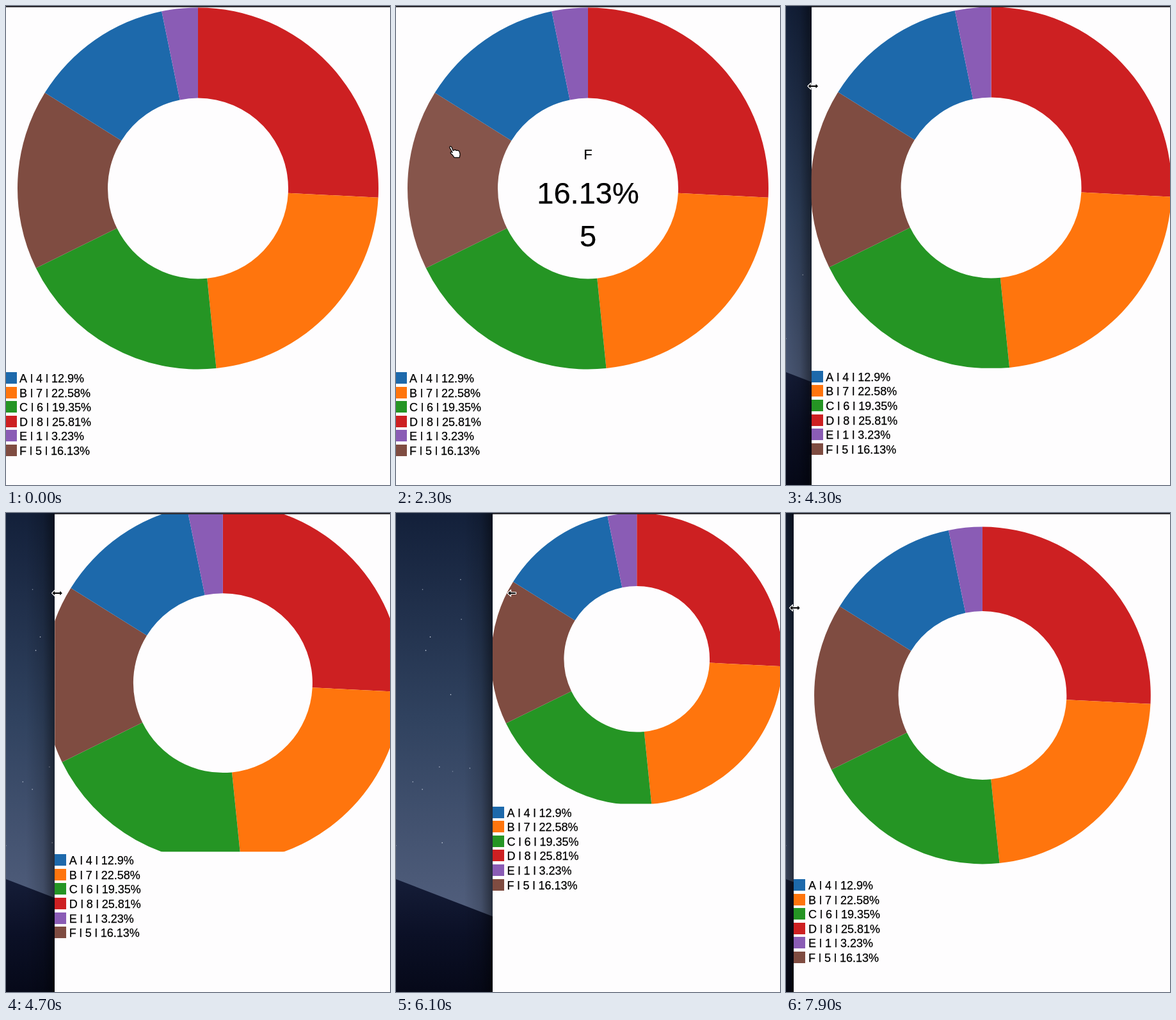
Recreate the animation shown at these times as an HTML page. Size 600x747 px, loop 8000 ms.

```html
<!DOCTYPE html>
<html lang="en">
<head>
<meta charset="utf-8">
<title>Resizable donut chart</title>
<style>
  html, body { margin: 0; width: 100%; height: 100%; overflow: hidden; background: #fefdfe; }
  svg { display: block; width: 600px; height: 747px; font-family: "Liberation Sans", Arial, sans-serif; }
  text { font-kerning: none; stroke: #000; stroke-width: .25; }
  rect { shape-rendering: crispEdges; }
</style>
</head>
<body>
<svg viewBox="0 0 600 747">
  <defs>
    <linearGradient id="sky" x2="0" y2="1">
      <stop offset="0" stop-color="#13203a"/>
      <stop offset=".5" stop-color="#30425f"/>
      <stop offset="1" stop-color="#53607e"/>
    </linearGradient>
    <linearGradient id="hill" x2="0" y2="1">
      <stop offset="0" stop-color="#151d38"/>
      <stop offset=".5" stop-color="#0b1026"/>
      <stop offset="1" stop-color="#060919"/>
    </linearGradient>
    <linearGradient id="shade">
      <stop offset="0" stop-color="#000" stop-opacity="0"/>
      <stop offset=".6" stop-color="#000" stop-opacity=".16"/>
      <stop offset="1" stop-color="#000" stop-opacity=".5"/>
    </linearGradient>
    <clipPath id="chart"><rect y="2"/></clipPath>
  </defs>
  <rect width="160" height="640" fill="url(#sky)"/>
  <g id="stars" fill="#dfe6f2"></g>
  <path d="M0 571L160 632.500V747H0Z" fill="url(#hill)"/>
  <g id="window"></g>
</svg>
<script>
const LOOP = 8000, STEP = 100, RIGHT = 601.5, TOP = 2;
const TURN = 2 * Math.PI, DRAG = 3000;
const $ = s => document.querySelector(s);

const total = 31;
const data = [
  ['A', 4, '#1d69ab'], ['B', 7, '#ff750d'], ['C', 6, '#259524'],
  ['D', 8, '#cd2022'], ['E', 1, '#8a5cb5'], ['F', 5, '#7f4c41']
].map(([name, value, color]) =>
  ({ name, value, color, share: +(100 * value / total).toFixed(2) + '%' }));

// Slices run clockwise from the top, largest first.
const slices = [...data].sort((a, b) => b.value - a.value);
let angle = 0;
for (const s of slices) {
  s.from = angle;
  s.to = angle += s.value / total * TURN;
}

const ramp = (t, start, length) => Math.min(1, Math.max(0, (t - start) / length));
const easeOut = p => 1 - (1 - p) ** 2;
const easeInOut = p => p < .5 ? 4 * p ** 3 : 1 - 4 * (1 - p) ** 3;

// The window edge is dragged right to its limit and back; the ring eases after it.
const edgeAt = t => -1.5 + 152.5 * (ramp(t, 3850, 1667) - ramp(t, 6755, 1260));
const radiusAt = t =>
  282 - 56 * (easeInOut(ramp(t, 4210, 2350)) - easeInOut(ramp(t, 6400, 2680)));

// The pointer enters from the top, circles the ring, then leaves to grab the edge.
function cursorAt(t) {
  if (t < DRAG) {
    const a = ramp(t, 200, 1200) * .772 * TURN;
    const r = 320 - 145 * ramp(t, 200, 300);
    const exit = ramp(t, 2000, 1000);
    const x = 300 + r * Math.sin(a), y = 284 - r * Math.cos(a);
    return [x * (1 - exit), y + (125 - y) * exit];
  }
  const back = easeOut(ramp(t, 6700, 1200));
  return [181 * ramp(t, 3850, 1920) - 167 * back, 125 + 23 * back];
}

function hovered(t) {
  if (t >= DRAG) return;
  const [x, y] = cursorAt(t), dx = x - 300, dy = y - 284;
  const r = Math.hypot(dx, dy), a = (Math.atan2(dx, -dy) + TURN) % TURN;
  if (r > 141 && r < 282) return slices.find(s => a < s.to);
}

// Full highlight under the pointer, fading after it leaves.
function glow(slice, t) {
  for (let k = 0; k < 4; k++) if (hovered(t - k * STEP) === slice) return 1 - k / 4;
  return 0;
}

function ring(s, cx, cy, r) {
  const p = (a, q) => `${cx + q * Math.sin(a)} ${cy - q * Math.cos(a)}`, q = r / 2;
  return `M${p(s.from, r)}A${r} ${r} 0 0 1 ${p(s.to, r)}L${p(s.to, q)}A${q} ${q} 0 0 0 ${p(s.from, q)}Z`;
}

const box = (x, y, w, h, fill) =>
  `<rect x="${x}" y="${y}" width="${w}" height="${h}" fill="${fill}"/>`;
const label = (x, y, size, text, anchor = 'middle') =>
  `<text x="${x}" y="${y}" font-size="${size}" text-anchor="${anchor}">${text}</text>`;

const shapes = {
  both: 'M-8.5 0l5-5v3.5h7v-3.5l5 5-5 5v-3.5h-7v3.5z',
  left: 'M-7 0l5.5-5v3.5h8v3h-8v3.5z',
  arrow: 'M0 0v15l3.5-3 2.5 6 2.5-1-2.5-6h5z',
  hand: 'M-5 1q1-3 3.500 0l2 5q4-2 5 0 4-1 5 2l1 4-1 5h-8q-2-4-6-7 0-3 3-1z'
};

function pointer(t, edge) {
  const [x, y] = cursorAt(t);
  const kind = hovered(t) ? 'hand' : t < DRAG ? 'arrow' : edge > 150 && x > 155 ? 'left' : 'both';
  const [fill, stroke] = kind === 'hand' ? ['#fff', '#000'] : ['#000', '#fff'];
  return `<path transform="translate(${x} ${y})" d="${shapes[kind]}" fill="${fill}"
    stroke="${stroke}" stroke-width="1.2" stroke-linejoin="round"/>`;
}

function draw(t) {
  const edge = edgeAt(t), r = radiusAt(t);
  const width = RIGHT - edge, height = Math.min(565, width + 1);
  const cx = edge + width / 2, cy = TOP + height / 2;
  const clip = $('#chart rect');
  clip.setAttribute('x', edge);
  clip.setAttribute('width', width);
  clip.setAttribute('height', height);

  const pie = slices.map(s =>
    `<path d="${ring(s, cx, cy, r)}" fill="${s.color}" opacity="${1 - .055 * glow(s, t)}"/>`).join('');
  const legend = data.map((d, i) => {
    const y = Math.round(TOP + height + 4 + i * 22.6);
    return box(Math.round(edge), y, 18, 18, d.color) +
      label(edge + 22.5, y + 16, 18, `${d.name} l ${d.value} l ${d.share}`, 'start');
  }).join('');
  const s = hovered(t);
  const detail = s ? label(cx, 239, 22, s.name) + label(cx, 307.5, 47, s.share) + label(cx, 375, 47, s.value) : '';

  $('#window').innerHTML = box(edge - 45, 0, 45, 747, 'url(#shade)') +
    box(edge, 0, width, 747, '#fefdfe') + box(edge, 0, width, TOP, '#2c2b30') +
    `<g clip-path="url(#chart)">${pie}</g>` + legend + detail + pointer(t, edge);
}

let seed = 7;
const random = () => (seed = seed * 16807 % 2147483647) / 2147483647;
for (let i = 0; i < 13; i++) {
  $('#stars').innerHTML += `<circle cx="${random() * 125}" cy="${40 + random() * 520}"
    r=".8" opacity="${.4 + random() * .6}"/>`;
}

let shown = -1;
function tick() {
  const t = Math.floor(performance.now() % LOOP / STEP) * STEP;
  if (t !== shown) draw(shown = t);
  requestAnimationFrame(tick);
}
tick();
</script>
</body>
</html>
```
